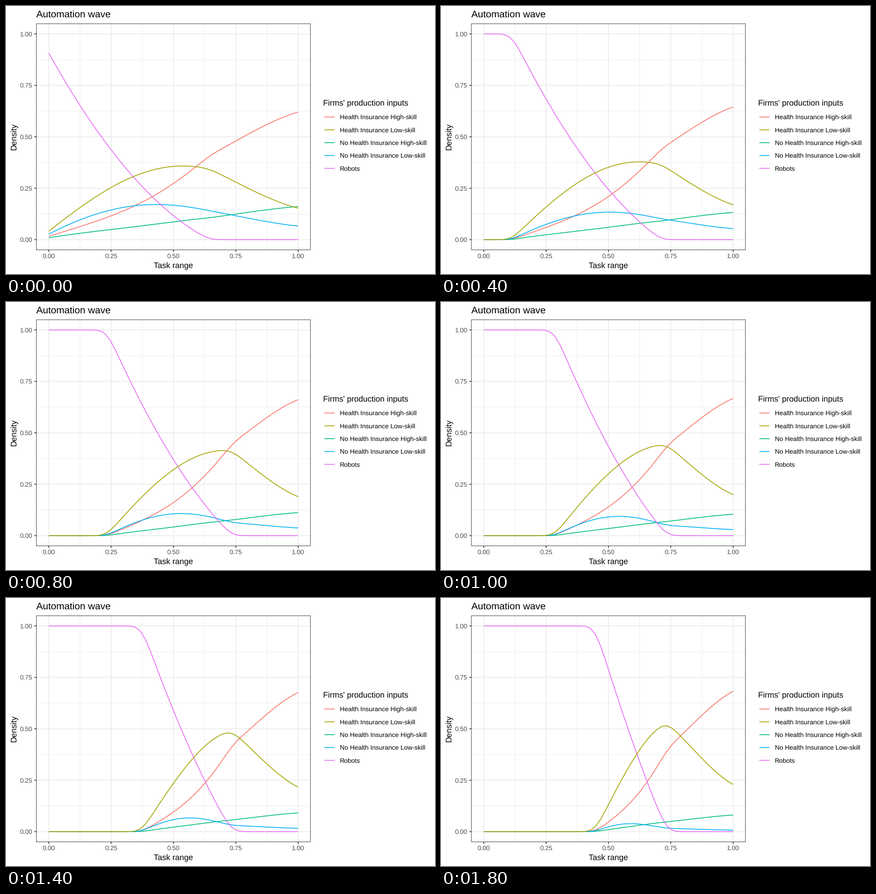
A matplotlib script for the animation above (2000 ms loop, 947 px wide and 592 px high).

```python
import matplotlib.pyplot as plt
import numpy as np
from matplotlib.animation import FuncAnimation

W, H, DPI = 947, 592, 100
PT = 72 / DPI  # points per pixel
FRAMES, INTERVAL = 10, 200

plt.rcParams.update({
    "font.family": "Liberation Sans",
    "path.snap": False,
    "text.hinting": "none",
    "lines.solid_capstyle": "butt",
})

LEFT, RIGHT, TOP, BOTTOM = 67.1, 672.0, 39.2, 538.6
STROKE = 1.73
GRID, DARK, GREY = "#EBEBEB", "#333333", "#4D4D4D"

# Name, colour and stacking order of each input.
INPUTS = [
    ("Health Insurance High-skill", "#F8766D", 3.0),
    ("Health Insurance Low-skill", "#A3A500", 5.0),
    ("No Health Insurance High-skill", "#00BF7D", 3.2),
    ("No Health Insurance Low-skill", "#00B0F6", 3.4),
    ("Robots", "#E76BF3", 3.6),
]

TASKS = np.linspace(0, 1, 50)
BLUR = .024  # width over which corners are rounded


def px(x):
    return 94.5 + 550.4 * np.asarray(x)


def py(y):
    return 516.2 - 454.6 * np.asarray(y)


def smooth(f):
    """Values of f at the tasks, averaged with a Gaussian weight."""
    z = np.linspace(-3, 3, 61)
    weight = np.exp(-z * z / 2)
    return f(TASKS[:, None] + BLUR * z) @ (weight / weight.sum())


def logistic(v):
    return 1 / (1 + np.exp(-v))


def wave_reach(t):
    """How far the wave has moved; it slows down with time."""
    return t / (11.6 + .76 * t)


def robot_end(t):
    """First task without robots."""
    return .735 - .09 * max(0, 1 - t / 4) ** 2


def robot_density(t):
    start, end = wave_reach(t) - .042, robot_end(t)
    bend = .43 + .044 * t

    def profile(x):
        s = np.clip((end - x) / (end - start), 0, 1)
        return s * (bend + (1 - bend) * s)

    return smooth(profile)


def high_skill_share(t):
    front = .73 * wave_reach(t)
    u = np.clip((TASKS - front) / (1 - front), 0, 1)
    low, high = .25 + .02 / (1 + t), .781 - .002 * t
    return low + (high - low) * u * u * (.15 + 2.85 * u - 2 * u * u)


def insured_high(t):
    """Insured part of high-skill work: rises until the robots end."""
    top = 1 - 1 / (4.85 + .51 * t)
    gap = smooth(lambda x: np.maximum(robot_end(t) - x, 0))
    return top - (.234 + .008 * t) * gap


def insured_low(t):
    """Insured part of low-skill work: peaks where the robots end."""
    end = robot_end(t)
    last = .84 + .12 * t + .0185 * t * t
    fall = .15 + .9 * np.sin(np.pi * t / FRAMES) ** 2
    drop = .2 + .25 * t + .8 * .25 ** t
    width = .18 + .8 * .5 ** t

    def logit(x):
        gap = np.maximum(end - x, 0)
        return (last + fall * (1 - np.maximum(x, end))
                - drop * (1 - np.exp(-gap / width)))

    return logistic(smooth(logit))


def densities(t):
    robots = robot_density(t)
    high = (1 - robots) * high_skill_share(t)
    low = 1 - robots - high
    high_in = high * insured_high(t)
    low_in = low * insured_low(t)
    return high_in, low_in, high - high_in, low - low_in, robots


fig = plt.figure(figsize=(W / DPI, H / DPI), dpi=DPI, facecolor="white")
ax = fig.add_axes([0, 0, 1, 1])
ax.set_xlim(0, W)
ax.set_ylim(H, 0)
ax.axis("off")


def stroke(xs, ys, color, width=STROKE, z=2):
    return ax.plot(xs, ys, color=color, lw=width * PT, zorder=z)[0]


def label(x, y, text, size, color="black", **kw):
    ax.text(x, y, text, fontsize=size * PT, color=color,
            va="baseline", **kw)


def draw_panel():
    for k in range(4):
        mid = .125 + .25 * k
        stroke([px(mid)] * 2, [TOP, BOTTOM], GRID, STROKE / 2, 1)
        stroke([LEFT, RIGHT], [py(mid)] * 2, GRID, STROKE / 2, 1)
    for k in range(5):
        v = k / 4
        x, y = px(v), py(v)
        stroke([x, x], [TOP, BOTTOM], GRID)
        stroke([LEFT, RIGHT], [y, y], GRID)
        stroke([x, x], [BOTTOM, BOTTOM + 4.5], DARK)
        stroke([LEFT - 4.5, LEFT], [y, y], DARK)
        label(x, 557.3, f"{v:.2f}", 14.26, GREY, ha="center")
        label(58.4, y + 5.1, f"{v:.2f}", 14.26, GREY, ha="right")
    stroke([LEFT, RIGHT, RIGHT, LEFT, LEFT],
           [TOP, TOP, BOTTOM, BOTTOM, TOP], DARK, 1, 8)
    label(67, 24.4, "Automation wave", 21.4)
    label(369.5, 578.4, "Task range", 17.8, ha="center")
    label(21.4, 288.8, "Density", 17.8, ha="center",
          rotation=90, rotation_mode="anchor")


def draw_legend():
    label(700, 219.5, "Firms' production inputs", 17.8)
    for k, (name, color, _) in enumerate(INPUTS):
        y = 245.2 + 28.35 * k
        stroke([702.7, 725.4], [y, y], color)
        label(737, y + 5.1, name, 14.26)


draw_panel()
draw_legend()
lines = [stroke([], [], color, z=z) for _, color, z in INPUTS]


def update(frame):
    for line, y in zip(lines, densities(frame)):
        line.set_data(px(TASKS), py(y))
    return lines


anim = FuncAnimation(fig, update, frames=FRAMES, interval=INTERVAL,
                     init_func=lambda: update(0), repeat=True,
                     repeat_delay=0, blit=False)
plt.show()
```
